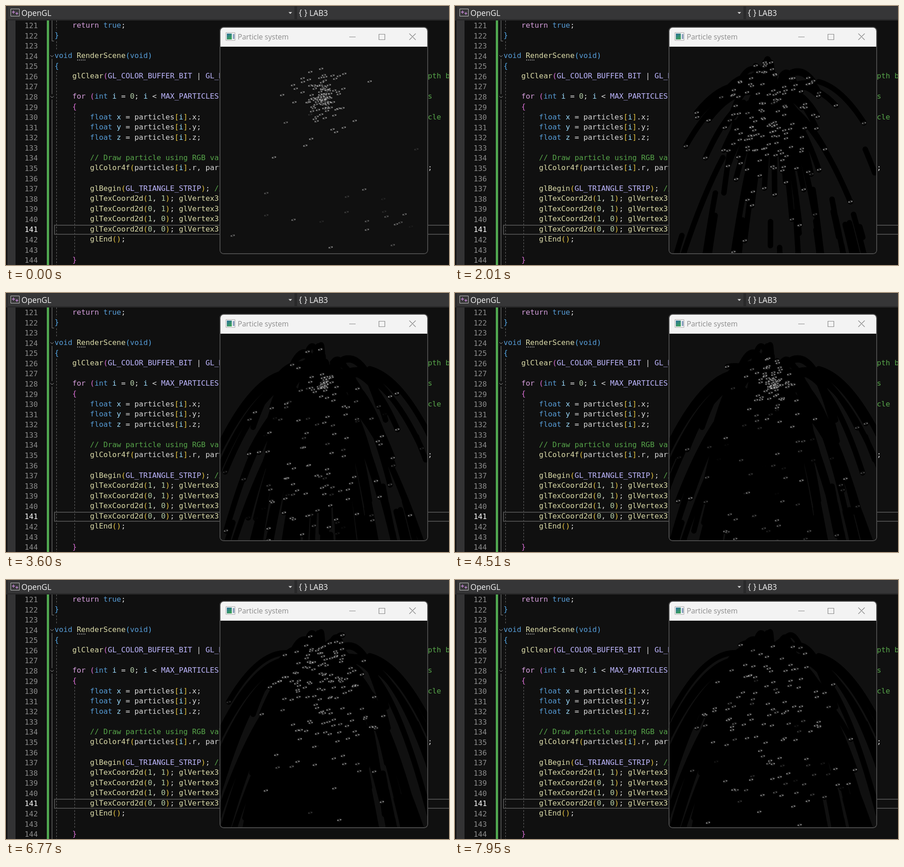
An HTML page with a canvas for the animation above (8000 ms loop, 977x573 px).

```html
<!DOCTYPE html>
<html lang="en">
<head>
<meta charset="utf-8">
<title>Particle system</title>
<style>
  html, body { margin: 0; width: 100%; height: 100%; overflow: hidden; background: #101010; }
  svg, canvas { position: absolute; display: block; }
  svg { left: 0; top: 0; }
  canvas { left: 473px; top: 90px; border-radius: 0 0 7px 7px; }
  text { white-space: pre; }
  .code { font: 16.28px "DejaVu Sans Mono", "Noto Sans Mono", monospace; fill: #dadada; }
  .ui { font: 17.3px "Open Sans", "Noto Sans", sans-serif; fill: #f4f4f4; }
  .title { font-size: 16px; fill: #8b8b8b; }
  .k { fill: #569cd6 } .c { fill: #d8a0df } .f { fill: #dcdcaa } .m { fill: #beb7ff }
  .n { fill: #b5cea8 } .v { fill: #9cdcfe } .g { fill: #57a64a }
  .b1 { fill: #55a9e8 } .b2 { fill: #da70d6 } .b3 { fill: #e6c440 }
  .num { fill: #8c8c8c } .now { fill: #fff }
  .guide { stroke: #6a6a6a; stroke-dasharray: 4 3; }
</style>
</head>
<body>
<svg width="977" height="573" fill="none">
  <rect width="977" height="573" fill="#101010"/>
  <rect x="3" y="32" width="18" height="541" fill="#333334"/>
  <rect x="90" y="32" width="5" height="541" fill="#50a850"/>
  <g stroke="#868686">
    <path d="M101.5 32V77.5H106M101.5 117V195M101.5 207V573"/>
    <path d="M98 109l3.5 3.5 3.5-3.5M98 199.5l3.5 3.5 3.5-3.5" stroke="#b0b0b0"/>
  </g>
  <path class="guide" d="M111.5 32V54M111.5 78V98M111.5 145V573M151.5 236V551"/>
  <path d="M980 485H107V505H980" stroke="#4b4b4b" stroke-width="2"/>
  <path d="M157 119.5H176" stroke="#a0a0a0" stroke-width="2" stroke-dasharray="2 2"/>
  <g id="code" class="code"></g>

  <rect width="977" height="32" fill="#2a2a2b"/>
  <path d="M4 1H636V29H4ZM642 1H977V29H642Z" fill="#363637"/>
  <path d="M10.5 6.5H29.5V22.5H10.5Z" stroke="#c8c8c8"/>
  <path d="M13 13.5h7M16.5 10v7M21 16.5h6M24 13.5v6" stroke="#c58ad6" stroke-width="1.5"/>
  <path d="M623 13.5h8l-4 4z" fill="#dcdcdc"/>
  <text class="ui" x="34" y="21.5">OpenGL</text>
  <text class="ui" x="646" y="21">{</text>
  <text class="ui" x="658" y="21">}</text>
  <text class="ui" x="669" y="21.5">LAB3</text>

  <rect x="472" y="47" width="458" height="501" rx="8" fill="#101010"/>
  <path d="M473 90V55a8 8 0 0 1 8-8H921a8 8 0 0 1 8 8V90Z" fill="#f3f3f3"/>
  <rect x="472" y="47" width="458" height="501" rx="8" stroke="#4a4a4a" stroke-width="2"/>
  <path d="M485 59H505V76H485Z" fill="#fafafa" stroke="#9c9c9c"/>
  <path d="M487 61H498V74H487Z" fill="url(#tile)"/>
  <path d="M500 62h4v11h-4z" fill="#8fa3c0"/>
  <linearGradient id="tile" x2="0.6" y2="1">
    <stop stop-color="#2b6f9c"/><stop offset="1" stop-color="#3ba05a"/>
  </linearGradient>
  <text class="ui title" x="511" y="74">Particle system</text>
  <path d="M757 68.5H771M822.5 62.5H835.5V74.5H822.5ZM889.5 61l14 14M903.5 61l-14 14" stroke="#858585" stroke-width="1.2"/>
</svg>
<canvas id="view" width="456" height="457"></canvas>

<script>
const COL = 9.8, LEFT = 107, ROW = 22.57, FIRST = 121;

// Markup: ~class|text~ colours a run, everything else stays plain.
const texCoord = (s, t) =>
  `        ~f|glTexCoord2d~~b3|(~~n|${s}~, ~n|${t}~~b3|)~; ~f|glVertex3f~~b3|(~`;
const member = a =>
  `        ~k|float~ ~v|${a}~ = particles~b3|[~~v|i~~b3|]~.${a};`;
const lines = [
  '    ~c|return~ ~k|true~;',
  '~b1|}~',
  '',
  '~k|void~ ~f|RenderScene~~b1|(~~k|void~~b1|)~',
  '~b1|{~',
  '    ~f|glClear~~b2|(~~m|GL_COLOR_BUFFER_BIT~ | ~m|GL_DE~',
  '',
  '    ~c|for~ ~b2|(~~k|int~ ~v|i~ = ~n|0~; ~v|i~ < ~m|MAX_PARTICLES~',
  '    ~b2|{~',
  member('x'), member('y'), member('z'),
  '',
  '        ~g|// Draw particle using RGB val~',
  '        ~f|glColor4f~~b3|(~particles~b3|[~~v|i~~b3|]~.r, part',
  '',
  '        ~f|glBegin~~b3|(~~m|GL_TRIANGLE_STRIP~~b3|)~; ~g|//~',
  texCoord(1, 1), texCoord(0, 1), texCoord(1, 0), texCoord(0, 0),
  '        ~f|glEnd~~b3|()~;',
  '',
  '    ~b2|}~'
];
// Line ends that reappear on the right of the window: line, column, markup.
const tails = [
  [126, 82, '~g|depth buffer~'], [128, 76, '~g|particles~'],
  [130, 79, '~g|particle~'], [135, 83, '~b3|)~;']
];

const colour = s => s.replace(/</g, '&lt;')
  .replace(/~(\w+)\|([^~]*)~/g, '<tspan class="$1">$2</tspan>');
const textAt = (x, base, n, s, cls = '') =>
  `<text x="${x}" y="${base + (n - FIRST) * ROW}" class="${cls}">${colour(s)}</text>`;
const codeAt = (col, n, s) => textAt(LEFT + col * COL, 47.5, n, s);
const numberAt = n => textAt(41, 49, n, String(n), n === 141 ? 'now' : 'num');

document.getElementById('code').innerHTML =
  lines.map((s, i) => numberAt(FIRST + i) + codeAt(0, FIRST + i, s)).join('')
  + tails.map(([n, col, s]) => codeAt(col, n, s)).join('');

const LOOP = 8000, STEP = 45.5, HALF_G = 16.3;
const SOURCE = { x: 228, y: 118 };
const view = document.getElementById('view');
const ctx = view.getContext('2d');

let seed = 20;
function random() {
  seed = (seed + 0x6D2B79F5) | 0;
  let r = Math.imul(seed ^ (seed >>> 15), 1 | seed);
  r = (r + Math.imul(r ^ (r >>> 7), 61 | r)) ^ r;
  return ((r ^ (r >>> 14)) >>> 0) / 4294967296;
}

const particle = (birth, vx, up) => ({ birth, vx, up, life: 4.6 + 2 * random() });

function burst(count, start, length) {
  return Array.from({ length: count }, () => {
    const vx = 54 * (2 * random() - 1) * (0.4 + 0.6 * random());
    const fastest = Math.sqrt(72 * 72 - vx * vx);
    return particle(start + length * random() ** 0.6, vx, random() * (fastest + 27) - 27);
  });
}

// Outermost arcs: birth in s, sideways and upward speed in px/s.
const outer = [
  [-1.36, -50, 46.6], [-1.84, -50, 36], [-1.2, -52, 40.3], [-0.99, -47.5, 33.8],
  [-2.02, 50, 53], [-0.9, 48, 43], [-2.2, -50, -22], [-1.2, -5, 77],
  [0.35, -11, 77], [0.4, -2.5, 78], [0.1, -20, 71], [2.45, -49, 55.4],
  [3.3, -8, 72], [3.6, 12, 73], [4.3, 17, 75], [4.25, -12, 74],
  [5.3, -27, 67], [5.3, 0, 66]
].map(p => particle(...p));

const particles = [
  ...burst(60, -6.6, 2),
  ...burst(145, -2, 2.3),
  ...burst(145, 2.45, 2.9),
  ...outer
];

function makeGlint() {
  const c = document.createElement('canvas');
  c.width = 14; c.height = 12;
  const g = c.getContext('2d');
  const dot = (x, y, r, rgb, a) => {
    const glow = g.createRadialGradient(x, y, 0, x, y, r);
    glow.addColorStop(0, `rgba(${rgb},${a})`);
    glow.addColorStop(1, `rgba(${rgb},0)`);
    g.fillStyle = glow;
    g.fillRect(0, 0, 14, 12);
  };
  dot(7, 6, 6, '0,0,0', 0.7);
  dot(7, 4.2, 2.2, '255,255,255', 0.25);
  dot(7, 7.8, 2.2, '255,255,255', 0.25);
  dot(4, 6.7, 2.5, '255,255,255', 0.8);
  dot(10, 5.3, 2.5, '255,255,255', 0.8);
  return c;
}
const glint = makeGlint();

const place = (p, age) => ({
  x: SOURCE.x + p.vx * age,
  y: SOURCE.y - p.up * age + HALF_G * age * age
});

function drawTrails(now) {
  ctx.beginPath();
  for (const p of particles) {
    const from = Math.max(0, -p.birth);
    const to = Math.min(now - p.birth, p.life);
    if (to <= from) continue;
    const a = place(p, from), b = place(p, to), half = (to - from) / 2;
    ctx.moveTo(a.x, a.y);
    ctx.quadraticCurveTo(a.x + p.vx * half, a.y + (2 * HALF_G * from - p.up) * half, b.x, b.y);
  }
  ctx.lineWidth = 12;
  ctx.lineCap = 'round';
  ctx.strokeStyle = '#000';
  ctx.stroke();
}

function drawGlints(now) {
  for (const p of particles) {
    const age = now - p.birth;
    if (age < 0 || age > p.life) continue;
    const { x, y } = place(p, age);
    ctx.globalAlpha = Math.min(0.9, (p.life - age) / 2);
    ctx.drawImage(glint, Math.round(x) - 7, Math.round(y) - 6);
  }
  ctx.globalAlpha = 1;
}

function frame() {
  const t = performance.now() % LOOP;
  const now = Math.floor(t / STEP) * STEP / 1000;
  ctx.fillStyle = '#101010';
  ctx.fillRect(0, 0, view.width, view.height);
  drawTrails(now);
  drawGlints(now);
  requestAnimationFrame(frame);
}
frame();
</script>
</body>
</html>
```
